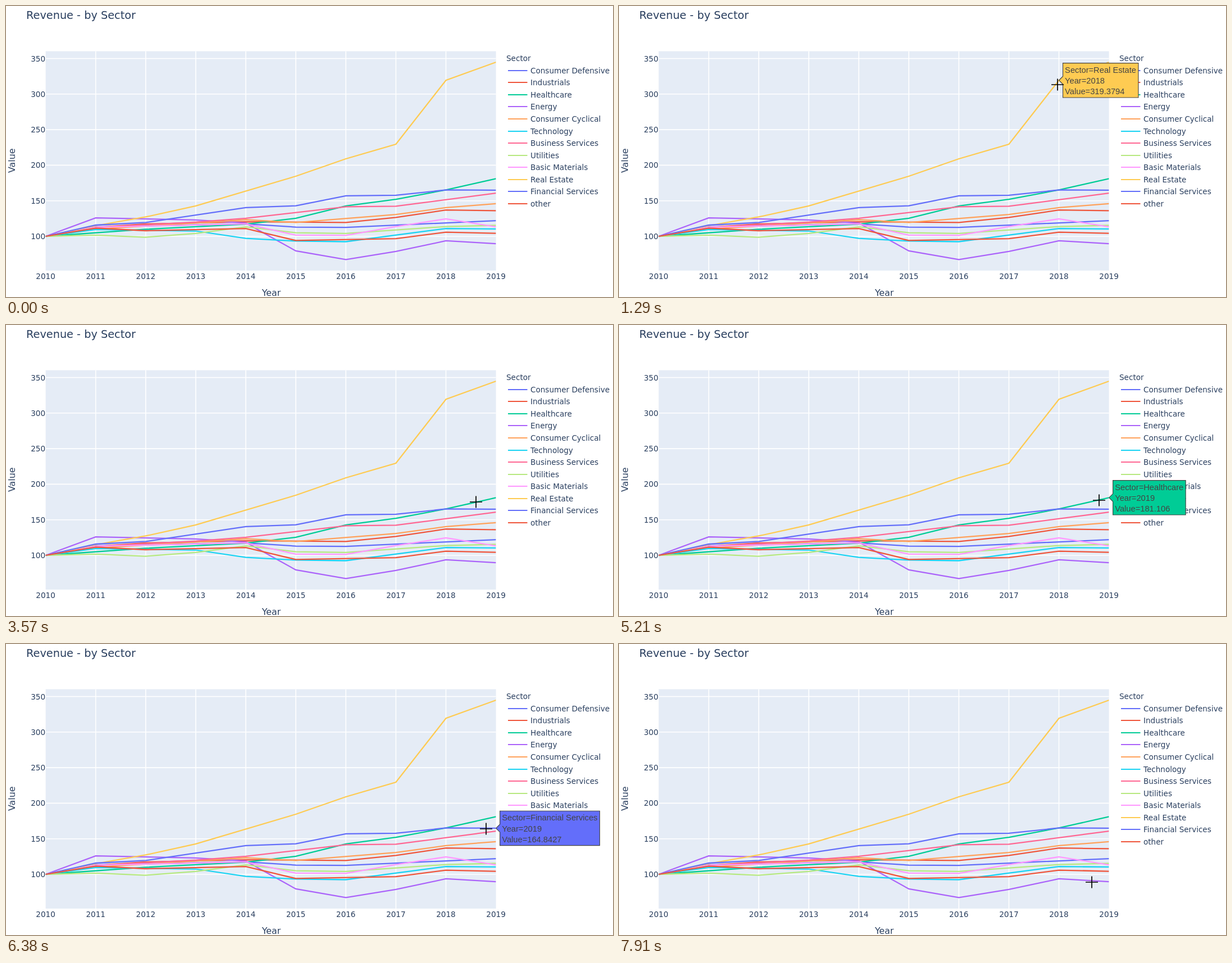
Animation of 1081x518 px, one loop 8000 ms. Source, as an HTML page:

```html
<!DOCTYPE html>
<html lang="en">
<head>
<meta charset="utf-8">
<title>Revenue by sector</title>
<style>
  html, body { margin: 0; width: 100%; height: 100%; overflow: hidden; background: #fff; }
  svg { display: block; width: 1081px; height: 518px; }
  text { font: 13.55px "DejaVu Sans", Verdana, sans-serif; fill: #2a3f5f; }
  text.title { font-size: 19.3px; }
  text.axis { font-size: 15.9px; }
  text.tip { font: 14.7px "Liberation Sans", Arial, sans-serif; fill: #444; }
</style>
</head>
<body>
<svg id="stage" viewBox="0 0 1081 518"></svg>
<script>
const LOOP = 8000, STEP_MS = 75, HOVER_RADIUS = 23.2;
const LEFT = 70.6, RIGHT = 872.6, TOP = 80.5, BOTTOM = 471;
const stage = document.getElementById('stage');

const yearX = year => LEFT + (year - 2010) * (RIGHT - LEFT) / 9;
const valueY = value => 410 - (value - 100) * 1.266;

function add(parent, tag, attrs = {}, text) {
  const el = document.createElementNS('http://www.w3.org/2000/svg', tag);
  for (const key in attrs) el.setAttribute(key, attrs[key]);
  if (text !== undefined) el.textContent = text;
  return parent.appendChild(el);
}
const label = (x, y, text, attrs) => add(stage, 'text', { x, y, ...attrs }, text);
const show = (el, on) => el.setAttribute('visibility', on ? 'visible' : 'hidden');

const palette = ['#636efa', '#ef553b', '#00cc96', '#ab63fa', '#ffa15a',
  '#19d3f3', '#ff6692', '#b6e880', '#ff97ff', '#fecb52'];

// Values at the years (counted from 2010) where each line bends; all start at 100.
const bends = {
  'Consumer Defensive': { 1: 113.4, 4: 117.4, 5: 113, 6: 112.6, 9: 122 },
  'Industrials': { 1: 112.6, 2: 117.4, 4: 120.5, 6: 119.4, 7: 126.5, 8: 137, 9: 136 },
  'Healthcare': { 2: 109.9, 4: 117, 5: 125.3, 6: 142.7, 7: 152.1, 8: 165.2, 9: 181.106 },
  'Energy': { 1: 126, 3: 123, 4: 118.6, 5: 79.5, 6: 67.3, 7: 78.7, 8: 93.7, 9: 89.7 },
  'Consumer Cyclical': { 1: 110.3, 3: 118.6, 4: 123.3, 5: 119.4, 7: 130.8, 8: 140.3, 9: 146 },
  'Technology': { 1: 109.5, 3: 107.5, 4: 97.2, 5: 93.3, 6: 92.5, 8: 111, 9: 110.3 },
  'Business Services': { 1: 112.6, 3: 120.1, 4: 125.3, 6: 141.5, 7: 142.3, 9: 160.7877 },
  'Utilities': { 1: 101.6, 2: 98.8, 3: 104, 4: 113.4, 5: 105.1, 6: 104, 8: 113.8, 9: 115.4 },
  'Basic Materials': { 1: 113, 4: 117.4, 5: 101.6, 6: 101.2, 7: 113.8, 8: 124.5, 9: 113.4 },
  'Real Estate': { 1: 115, 2: 127.3, 3: 142.7, 5: 184.5, 6: 209, 7: 229.5, 8: 319.3794, 9: 344.9 },
  'Financial Services': { 1: 115.8, 2: 119.4, 4: 140.3, 5: 143, 6: 156.9, 7: 157.7, 8: 165.2, 9: 164.8427 },
  'other': { 1: 111.5, 2: 107.9, 4: 111, 5: 94.1, 7: 96.8, 8: 105.9, 9: 104.3 }
};

// Pointer moves: start, end, destination.
const entry = { x: 832, y: 461 };
const moves = [
  [530, 834, 855, 312], [834, 1290, 781, 140], [2320, 3110, 831, 305], [3190, 3270, 837, 315],
  [3570, 3750, 839, 319], [3900, 4130, 855, 312], [5210, 5450, 855, 340.5], [5600, 5750, 855, 329],
  [6380, 6910, 852, 341.8], [6910, 7130, 845, 357], [7220, 7910, 842, 424]
];

label(36, 23.3, 'Revenue - by Sector', { class: 'title' });
const plot = { x: LEFT, y: TOP, width: RIGHT - LEFT, height: BOTTOM - TOP };
add(stage, 'rect', { ...plot, fill: '#e5ecf6' });

const grid = add(stage, 'g', { stroke: '#fff', 'stroke-width': 1.6 });
for (let year = 2010; year <= 2019; year++) {
  const x = yearX(year);
  if (year > 2010 && year < 2019) add(grid, 'path', { d: `M${x} ${TOP}V${BOTTOM}` });
  label(x, 485.8, year, { 'text-anchor': 'middle' });
}
for (let value = 100; value <= 350; value += 50) {
  const y = valueY(value);
  add(grid, 'path', { d: `M${LEFT} ${y}H${RIGHT}` });
  label(70, y + 5, value, { 'text-anchor': 'end' });
}
label(472.5, 516, 'Year', { class: 'axis', 'text-anchor': 'middle' });
label(0, 0, 'Value', {
  class: 'axis', 'text-anchor': 'middle', transform: 'translate(15.8 275.2) rotate(-90)'
});
label(891, 98, 'Sector');

add(add(add(stage, 'defs'), 'clipPath', { id: 'plot' }), 'rect', plot);
const lines = add(stage, 'g', { 'clip-path': 'url(#plot)', fill: 'none', 'stroke-width': 2.26 });
const points = [];
Object.entries(bends).forEach(([name, values], i) => {
  const color = palette[i % palette.length];
  const own = Object.entries({ 0: 100, ...values }).map(([offset, value]) => {
    const year = 2010 + Number(offset);
    return { name, color, year, value, x: yearX(year), y: valueY(value) };
  });
  points.push(...own);
  add(lines, 'polyline', { points: own.map(p => `${p.x},${p.y}`).join(' '), stroke: color });

  const y = Math.round(114.7 + i * 21.57);
  add(stage, 'path', { d: `M894 ${y}H928.5`, stroke: color, 'stroke-width': 2.1 });
  label(934, y + 5, name);
});

const tip = add(stage, 'g');
const tipBox = add(tip, 'path', { stroke: '#444', 'stroke-width': 1.13 });
const tipLines = [-1, 0, 1].map(row => add(tip, 'text', { class: 'tip', x: 10.6, y: 5.6 + row * 19.2 }));
const pointer = add(stage, 'path', { d: 'M-11 0H11M0 -10.5V10.5', stroke: '#000', 'stroke-width': 1.7 });

// Each move advances in even steps, then the pointer rests.
function pointerAt(t) {
  let { x, y } = entry;
  for (const [start, end, toX, toY] of moves) {
    if (t < start) break;
    const steps = Math.round((end - start) / STEP_MS);
    const p = Math.min(1, Math.floor((t - start) / (end - start) * steps + 0.01) / steps);
    x += (toX - x) * p;
    y += (toY - y) * p;
  }
  return { x, y };
}

function nearestPoint({ x, y }) {
  let best, reach = HOVER_RADIUS;
  for (const point of points) {
    const distance = Math.hypot(point.x - x, point.y - y);
    if (distance < reach) [best, reach] = [point, distance];
  }
  return best;
}

function drawTip({ name, color, year, value, x, y }) {
  [`Sector=${name}`, `Year=${year}`, `Value=${value}`].forEach((s, i) => tipLines[i].textContent = s);
  const width = Math.max(...tipLines.map(el => el.getComputedTextLength())) + 7.5;
  tipBox.setAttribute('d', `M0 0l7 -7v-23.7h${width}v61.4h${-width}v-23.7z`);
  tipBox.setAttribute('fill', color);
  tip.setAttribute('transform', `translate(${x} ${y})`);
}

function render(t) {
  const inside = t >= moves[0][0];
  const at = pointerAt(t);
  const hovered = inside && nearestPoint(at);
  show(pointer, inside);
  pointer.setAttribute('transform', `translate(${at.x} ${at.y})`);
  show(tip, hovered);
  if (hovered) drawTip(hovered);
}

const began = performance.now();
function tick() {
  render((performance.now() - began) % LOOP);
  requestAnimationFrame(tick);
}
tick();
</script>
</body>
</html>
```
